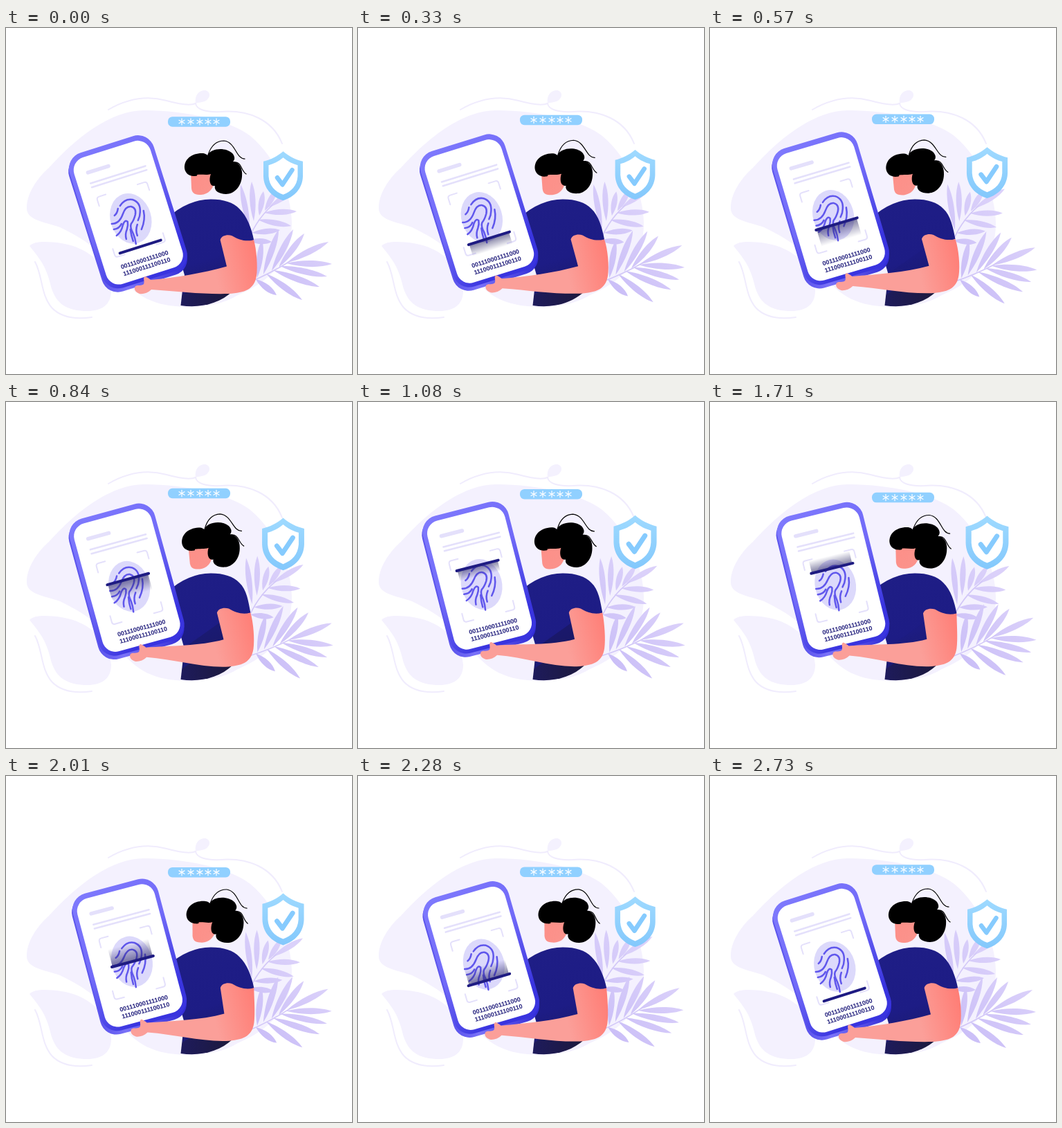
Recreate the animation shown at these times as an HTML page. Size 500 by 500 pixels, loop 2.76 s.

```html
<!DOCTYPE html>
<html lang="en">
<head>
<meta charset="utf-8">
<title>Fingerprint scan</title>
<style>
  html, body { margin: 0; width: 100%; height: 100%; overflow: hidden; background: #fff; }
  svg { display: block; width: 100vw; height: 100vh; }
  .line { fill: none; stroke-linecap: round; stroke-linejoin: round; }
  .code { font: bold 8.9px "Liberation Sans", Arial, sans-serif; fill: #211e7c; text-anchor: middle; }
</style>
</head>
<body>
<svg viewBox="0 0 500 500">
  <defs>
    <linearGradient id="bezel" x1="0" y1="0" x2=".35" y2="1">
      <stop offset="0" stop-color="#7f7afd"/><stop offset=".55" stop-color="#716af8"/><stop offset="1" stop-color="#3934df"/>
    </linearGradient>
    <linearGradient id="rim" x1="0" y1="0" x2="1" y2="0">
      <stop offset="0" stop-color="#5b54ec"/><stop offset=".25" stop-color="#7a72f8"/><stop offset="1" stop-color="#2c27d4"/>
    </linearGradient>
    <linearGradient id="skin" gradientUnits="userSpaceOnUse" x1="300" y1="345" x2="362" y2="330">
      <stop offset="0" stop-color="#fb9f99"/><stop offset="1" stop-color="#ff7e76"/>
    </linearGradient>
    <linearGradient id="face" x1="0" y1="0" x2="1" y2=".6">
      <stop offset="0" stop-color="#fd8f88"/><stop offset="1" stop-color="#fb938c"/>
    </linearGradient>
    <linearGradient id="cloth" x1="0" y1="0" x2=".3" y2="1">
      <stop offset="0" stop-color="#1f1e86"/><stop offset=".7" stop-color="#1d1c85"/><stop offset="1" stop-color="#1b1a70"/>
    </linearGradient>
    <linearGradient id="pants" x1="0" y1="0" x2="1" y2="0">
      <stop offset="0" stop-color="#1e1b5c"/><stop offset="1" stop-color="#1c193c"/>
    </linearGradient>
    <linearGradient id="sky" x1="0" y1="0" x2="0" y2="1">
      <stop offset="0" stop-color="#9fdaff"/><stop offset="1" stop-color="#83c8fc"/>
    </linearGradient>
    <linearGradient id="fade" x1="0" y1="0" x2="0" y2="1">
      <stop offset="0" stop-color="#25225f" stop-opacity=".6"/><stop offset="1" stop-color="#25225f" stop-opacity="0"/>
    </linearGradient>
    <linearGradient id="leafTone" gradientUnits="userSpaceOnUse" x1="350" y1="370" x2="440" y2="280">
      <stop offset="0" stop-color="#c9bdf7"/><stop offset="1" stop-color="#dbd1fa"/>
    </linearGradient>
  </defs>

  <g fill="#f4f1fe">
    <path d="M30 262C29 240 45 217 62 202C100 160 150 119 200 119C262 119 325 134 353 156C390 187 413 240 413 282C413 335 382 366 335 386C315 398 292 403 262 403C215 402 188 390 160 352C142 328 120 308 78 288C55 280 32 278 30 262Z"/>
    <path d="M34 315C40 308 58 308 80 311C120 317 150 345 152 380C152 400 138 409 118 409C88 409 71 399 64 370C58 343 46 330 34 315Z"/>
    <path d="M274 109C272 97 279 90 288 90C296 92 296 100 289 105C284 108 278 107 274 109Z"/>
  </g>
  <g class="line" stroke="#f0ecfd" stroke-width="2">
    <path d="M148 118C174 103 203 97 232 105C250 110 265 113 274 109C275 118 290 122 310 121C350 118 385 132 399 167"/>
    <path d="M42 338C53 358 50 385 66 404C80 419 103 421 124 418"/>
  </g>

  <g id="upperFrond" fill="url(#leafTone)"></g>
  <g id="lowerFrond" fill="url(#leafTone)"></g>

  <g id="badge"><rect x="-45" y="-7" width="90" height="14.5" rx="6.5" fill="#90d0ff"/></g>

  <g id="shield">
    <path d="M0-35C8-28 18-23 28.500-20.500V1C28 19 16 31 0 36C-16 31-28 19-28.500 1V-20.500C-18-23-8-28 0-35Z" fill="url(#sky)"/>
    <path d="M0-26C7-20 14-17 21-15V1C20 15 12 23 0 27.500C-12 23-20 15-21 1V-15C-14-17-7-20 0-26Z" fill="#fff"/>
    <path d="M-8.500 3L-1 13L13-8" class="line" stroke="#86cbfe" stroke-width="6.500"/>
  </g>

  <path d="M256 370L252.500 401C280 405 308 399 328 380L310 370Z" fill="url(#pants)"/>
  <path id="shirt" fill="url(#cloth)"/>
  <path id="shade" d="M262 352L310 318L318 345Z" fill="#18164f"/>

  <g id="phone">
    <rect x="-66.500" y="-109" width="128" height="206" rx="24" fill="url(#rim)"/>
    <rect x="-64.500" y="-112.600" width="127.500" height="204.600" rx="24" fill="url(#bezel)"/>
    <rect x="-58.500" y="-105" width="115.500" height="191.500" rx="19" fill="#fff"/>
    <g class="line" stroke="#e4e0fb">
      <path d="M-39-82H-8" stroke-width="5.500"/>
      <path d="M-40-66H43M-40-60H43" stroke-width="2.600"/>
      <path id="corners" stroke-width="2"/>
    </g>
    <ellipse rx="29.500" ry="37" fill="#dcd9fb"/>
    <g class="line" stroke="#6057ec" stroke-width="2.500" transform="rotate(17.500) translate(-180.500 -275.300)">
      <path d="M157 271Q161 268 162 261M165 257Q172 246 183 248Q195 252 194 266Q194 272 191 278"/>
      <path d="M153 283Q164 283 169 269Q173 257 181 258Q189 260 187 270Q185 278 181 283Q179 288 184 297Q187 304 188 312"/>
      <path d="M160 300Q167 295 169 285Q172 276 176 280Q177 285 175 291Q172 298 174 305M156 291Q164 290 167 283"/>
      <path d="M199 264Q202 277 196 291M190 284Q187 292 190 300M180 291Q181 300 184 308"/>
    </g>
    <g id="scan">
      <rect id="trail" x="-29" width="60" height="1" fill="url(#fade)"/>
      <path d="M-30 0H32" class="line" stroke="#1e1b82" stroke-width="4"/>
    </g>
    <text class="code" x="1" y="65.800">001110001111000</text>
    <text class="code" x="1" y="76.300">111000111100110</text>
  </g>

  <path id="arm" fill="url(#skin)"/>

  <g id="head">
    <path d="M267 209L268 232C269 240 274 241 282 241C292 240 299 234 301 222L299 208Z" fill="url(#face)"/>
    <path d="M258 203C257 190 268 181 283 181C288 181 290 183 291 184C296 173 318 172 327 181C331 186 331 190 328 193C338 194 342 204 341 214C340 230 329 240 318 240C308 240 300 235 302 228C294 230 293 218 296 211C290 213 283 211 276 212C277 214 275 214 270 214C263 213 259 209 258 203Z"/>
    <path d="M292 183C297 168 305 163 315 163C332 165 332 189 345 189M328 194C341 192 339 206 347 211" class="line" stroke="#000" stroke-width="1.200"/>
  </g>
</svg>

<script>
// One swing lasts a step less than the loop, so the rest pose is held for two steps.
const LOOP = 2760, STEP = 30, SWING = LOOP - STEP;
const $ = id => document.getElementById(id);
const move = (id, transform) => $(id).setAttribute('transform', transform);
const draw = (id, d) => $(id).setAttribute('d', d);
const cosine = deg => Math.cos(deg * Math.PI / 180);

// A pointed leaf from its stem joint to its tip.
function leaf([x0, y0, x1, y1], width) {
  const dx = x1 - x0, dy = y1 - y0, len = Math.hypot(dx, dy);
  const side = (k, w) => `${x0 + dx * k - dy / len * w} ${y0 + dy * k + dx / len * w}`;
  return `M${x0} ${y0}C${side(.35, width)} ${side(.75, width)} ${x1} ${y1}` +
         `C${side(.75, -width)} ${side(.35, -width)} ${x0} ${y0}Z`;
}

function frond(id, stem, width, leaves) {
  $(id).innerHTML = `<path d="${leaves.map(l => leaf(l, width)).join('')}"/>` +
    `<path d="${stem}" class="line" stroke="#d2c7f8" stroke-width="1.6"/>`;
}

frond('upperFrond', 'M346 318Q358 280 385 256', 5.5, [
  [352, 292, 339, 226], [358, 279, 355, 222], [366, 271, 372, 236], [374, 264, 391, 233],
  [380, 259, 422, 230], [373, 267, 420, 265], [364, 277, 412, 286], [355, 296, 396, 292], [350, 307, 384, 309]
]);
frond('lowerFrond', 'M350 368Q380 356 412 336', 6, [
  [363, 361, 370, 306], [372, 356, 394, 291], [384, 351, 415, 291], [394, 346, 431, 297], [406, 339, 466, 309],
  [405, 340, 471, 341], [396, 344, 464, 359], [386, 350, 453, 374], [376, 355, 428, 393], [361, 363, 391, 386]
]);

draw('corners', [[-1, -44], [1, -44], [-1, 47], [1, 47]].map(([sx, y]) => {
  const x = 38 * sx, sy = Math.sign(y);
  return `M${x - 14 * sx} ${y}H${x - 4 * sx}Q${x} ${y} ${x} ${y - 4 * sy}V${y - 13 * sy}`;
}).join(''));

$('badge').innerHTML += [-25, -12, 1, 13, 25].map(x => [0, 60, 120].map(a =>
  `<path d="M0-4.600V4.600" class="line" stroke="#fff" stroke-width="1.200" transform="translate(${x} .3) rotate(${a})"/>`
).join('')).join('');

function drawBody(hem, elbow, hand) {
  const pt = (shift, x, y) => `${x + shift[0]} ${y + shift[1]} `;
  const h = (x, y) => pt(hem, x, y), e = (x, y) => pt(elbow, x, y), w = (x, y) => pt(hand, x, y);
  draw('shirt', `M234 274Q262 248 296 247.500Q324 247.500 337 261C348 271 ${h(354.5, 290)}${h(357.5, 306)}` +
    `C${h(346, 311)}${h(336, 307)}${h(326, 302)}L${h(312, 311)}L${e(320, 347)}L255 385L258 357Z`);
  draw('arm', `M${h(309, 306)}C${h(311, 299)}${h(320, 298)}${h(326, 300)}` +
    `C${h(336, 306)}${h(346, 309)}${h(357.5, 306)}` +
    `C${e(362, 320)}${e(364, 345)}${e(362, 358)}C${e(359, 378)}${e(345, 382.5)}${e(322, 384)}` +
    `C${e(285, 385)}${w(250, 381)}${w(210, 378)}` +
    `C${w(205, 383)}${w(198, 385)}${w(193, 384)}C${w(187, 382)}${w(184, 377)}${w(187, 373)}` +
    `C${w(190, 371)}${w(196, 373)}${w(199, 370)}C${w(201, 366)}${w(197, 361)}${w(201, 359)}` +
    `C${w(204, 360)}${w(207, 362)}${w(209, 364)}` +
    `C${w(245, 361)}${e(285, 354)}${e(319, 344.5)}Z`);
}

function render(time) {
  const phase = 360 * time / SWING;
  const wave = (mean, size, lag = 0) => mean + size * cosine(phase - lag);
  const lift = wave(-1, 1);

  move('upperFrond', `rotate(${wave(2.9, 2.9, 185)} 350 350)`);
  move('lowerFrond', `rotate(${wave(2, 3.4, 125)} 355 365)`);
  move('badge', `translate(279 ${wave(135.2, 3.7, 270)})`);
  move('shield', `translate(400.5 ${wave(207, 6.3)}) scale(${wave(1.05, -.05)})`);
  move('phone', `translate(${wave(180, 2, -82)} ${wave(268.7, 6.6)}) rotate(${wave(-15.6, -2, 15)})`);
  move('scan', `translate(0 ${wave(3.5, 39.5)})`);
  move('trail', `scale(1 ${wave(0, 26, 90)})`);
  move('head', `rotate(${wave(-.4, 2.6, 280)} 290 275)`);
  $('shade').setAttribute('opacity', Math.max(0, wave(-.1, .6, 150)));
  drawBody([wave(-1.3, 3, -50), wave(-.5, 1, -50)], [3.3 * lift, lift], [5 * lift, 6.8 * lift]);
}

function tick() {
  render(Math.floor(performance.now() % LOOP / STEP) * STEP);
  requestAnimationFrame(tick);
}
tick();
</script>
</body>
</html>
```
